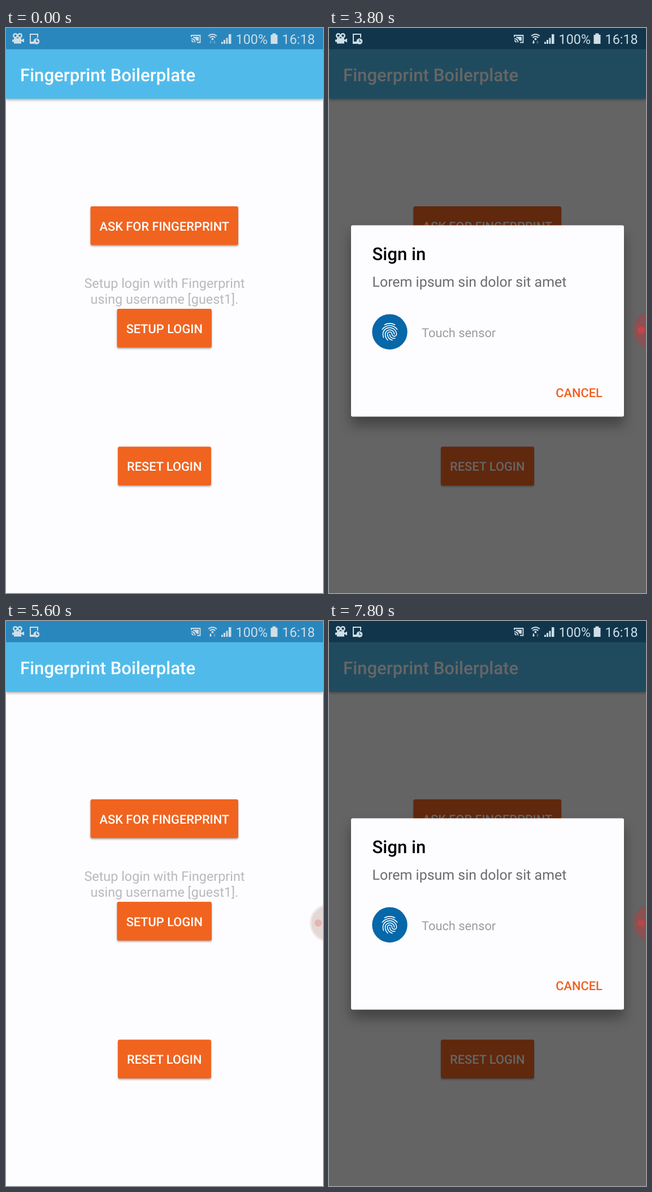
An HTML page for the animation above (8 s loop, 561 by 998 pixels).

```html
<!DOCTYPE html>
<html lang="en">
<head>
<meta charset="utf-8">
<title>Fingerprint sign in</title>
<style>
  html, body { margin: 0; width: 100%; height: 100%; overflow: hidden; background: #fdfcfe; }
  svg { display: block; width: 100%; height: 100%; }
  text { font: 400 21.82px Roboto, sans-serif; white-space: pre; text-rendering: geometricPrecision; }
  .title { font-size: 31.17px; font-weight: 500; }
  .lead { font-size: 24.93px; }
  .medium { font-weight: 500; }
  .mid { text-anchor: middle; }
  .hint { font-size: 23.38px; fill: #b9b8bb; }
  .status { font-size: 23.4px; }
  .button rect { fill: #f06420; filter: drop-shadow(0 2px 1.5px rgba(0,0,0,.32)); }
  .button text { fill: #fff; font-weight: 500; text-anchor: middle; }
  .bar { filter: drop-shadow(0 2px 2.5px rgba(0,0,0,.35)); }
  .card { filter: drop-shadow(0 15px 11px rgba(0,0,0,.34)); }
  .line { fill: none; stroke: currentColor; }

  .scrim, .dialog, .ready, .done, .bubble, .rim, .arrows { animation: 8s step-end infinite; }
  .scrim { animation-name: scrim; }
  .dialog { animation-name: dialog; }
  .ready { animation-name: ready; }
  .done { animation-name: done; }
  .bubble { animation-name: bubble; }
  .rim { animation-name: rim; }
  .arrows { animation-name: arrows; }
  .dot { animation: pulse 1.6s steps(2, end) infinite; }

  @keyframes scrim {
    0%, 67.5% { opacity: 0; }
    7.5%, 87.5% { opacity: .54; }
    10%, 90%, 100% { opacity: .6; }
  }
  @keyframes dialog {
    0%, 67.5% { opacity: 0; }
    7.5%, 87.5%, 100% { opacity: 1; }
  }
  @keyframes ready {
    0%, 67.5%, 100% { opacity: 1; }
    52.5% { opacity: 0; }
  }
  @keyframes done {
    0%, 67.5%, 100% { opacity: 0; }
    52.5% { opacity: 1; }
  }
  @keyframes bubble {
    0%, 75% { opacity: 0; }
    7.5%, 87.5%, 100% { opacity: 1; }
  }
  @keyframes rim {
    0%, 87.5% { fill: #a46262; stroke: #a06464; }
    10%, 90% { fill: #ae5554; stroke: #a35655; }
    15%, 95%, 100% { fill: #8c5152; stroke: #785859; }
    67.5% { fill: #e3d8d5; stroke: #f1e9e6; }
  }
  @keyframes arrows {
    0% { opacity: .3; }
    20%, 100% { opacity: 1; }
  }
  @keyframes pulse {
    0%, 100% { opacity: .4; }
    25% { opacity: 1; }
    50% { opacity: .22; }
    75% { opacity: .4; }
  }
</style>
</head>
<body>
<svg viewBox="0 0 561 998" preserveAspectRatio="none">
  <rect width="561" height="998" fill="#fdfcfe"/>
  <rect class="bar" width="561" height="125" fill="#50bbeb"/>
  <rect width="561" height="37.5" fill="#2a87be"/>
  <text class="title" x="25" y="93.5" fill="#fff">Fingerprint Boilerplate</text>

  <g class="button">
    <rect x="149.5" y="315" width="261.5" height="68.5" rx="3"/>
    <text x="280.3" y="358">ASK FOR FINGERPRINT</text>
  </g>
  <text class="hint mid" x="280.5" y="458.5">Setup login with Fingerprint</text>
  <text class="hint mid" x="280.5" y="486.5">using username [guest1].</text>
  <g class="button">
    <rect x="196.5" y="496" width="167.5" height="68.5" rx="3"/>
    <text x="280.3" y="539">SETUP LOGIN</text>
  </g>
  <g class="button">
    <rect x="198" y="739.5" width="165" height="68.5" rx="3"/>
    <text x="280.3" y="782">RESET LOGIN</text>
  </g>

  <rect class="scrim" width="561" height="998"/>

  <g fill="#d0dee6" color="#d0dee6">
    <!-- recorder camera -->
    <g class="line" stroke-width="2.4">
      <circle cx="16.5" cy="13.5" r="3.3"/>
      <circle cx="24.5" cy="13.5" r="3.3"/>
    </g>
    <path d="M14 18h13v3l5-2.5v7L27 23v4.5H14v-3h-3v-4h3z"/>
    <!-- device with clock -->
    <path class="line" stroke-width="2" d="M56 17V11H43v16h6"/>
    <path d="M43 24h7v4h-7z"/>
    <circle cx="54" cy="23.5" r="5.3"/>
    <path fill="none" stroke="#2a6588" stroke-width="1.4" d="M54 20v4h3"/>
    <!-- cast -->
    <path class="line" stroke-width="1.8" d="M328 16v-3h15.5v12.5H338M328 19q6.5 0 6.5 6.5M328 22.5q3 0 3 3"/>
    <path d="M331 15.5h10v7h-4q-1.5-4.5-6-5.5z"/>
    <!-- wifi -->
    <path class="line" stroke-width="1.9" d="M358 14q7.5-6 15 0M360.5 17q5-4 10 0"/>
    <circle cx="365.5" cy="19.5" r="1.9"/>
    <path class="arrows" d="M361 22h2v3h1.5L362 28l-2.5-3h1.5z"/>
    <path opacity=".3" d="M368 28h2v-3h1.5L369 22l-2.5 3h1.5z"/>
    <!-- signal -->
    <path d="M381 24.5h3V28h-3zM385 21h3v7h-3zM389.5 17.5h3V28h-3zM394 11h4.5v17H394z"/>
    <!-- battery -->
    <path d="M471.5 9.5h6V12h3v16h-12V12h3z"/>
    <text class="status" x="406.5" y="28">100%</text>
    <text class="status" x="488.5" y="28">16:18</text>
  </g>

  <g class="dialog">
    <rect class="card" x="39" y="348.5" width="483" height="338" rx="3" fill="#fdfcfe"/>
    <text class="title" x="76.5" y="410" fill="#000">Sign in</text>
    <text class="lead" x="76.5" y="457.3" fill="#6c6b6e">Lorem ipsum sin dolor sit amet</text>
    <g class="ready">
      <circle cx="107.5" cy="536.7" r="31.2" fill="#0667a9"/>
      <g transform="translate(107.5 536.7) scale(1.56) translate(-12 -12)"
         fill="none" stroke="#fff" stroke-linecap="round">
        <path d="M6.2 4C7.9 3 9.9 2.5 12 2.5c2 0 3.8.45 5.8 1.5"/>
        <path d="M3.5 9.2c.95-1.33 2.15-2.4 3.57-3.1 3-1.6 6.85-1.6 9.85 0 1.42.7 2.62 1.77 3.57 3.1"/>
        <path d="M9.75 21.3c-.8-.8-1.26-1.35-1.9-2.5-.65-1.15-1-2.6-1-4.1 0-2.7 2.3-4.9 5.15-4.9s5.15 2.2 5.15 4.9"/>
        <path d="M12 14.7c0 1.55.8 3.05 2.15 3.95.8.55 1.7.8 2.8.8q.4 0 1.1-.1"/>
        <path d="M14.9 21.5c-1.5-.4-2.45-.95-3.5-2-1.3-1.3-2-3-2-4.85a2.58 2.44 0 0 1 5.16 0a2.58 2.44 0 0 0 5.16 0c0-4.05-3.47-7.33-7.75-7.33-3.04 0-5.8 1.7-7.06 4.3-.42.9-.64 1.9-.64 3 0 .82.08 2.1.7 3.8"/>
      </g>
      <text x="164" y="545.5" fill="#9c9b9e">Touch sensor</text>
    </g>
    <g class="done">
      <circle cx="107.5" cy="536.7" r="31.2" fill="#049587"/>
      <path d="M90.5 538.3l10.6 10.6 24.3-24.3" fill="none" stroke="#fff" stroke-width="4.4"/>
      <text x="164" y="545.5" fill="#049587">Fingerprint recognized</text>
    </g>
    <text class="medium" x="401.2" y="651.8" fill="#f06020">CANCEL</text>
  </g>

  <g class="bubble">
    <circle class="rim" cx="571" cy="533.5" r="32" stroke-width="3"/>
    <circle class="dot" cx="552.5" cy="533.5" r="6.5" fill="#f23a45"/>
  </g>
</svg>
</body>
</html>
```
